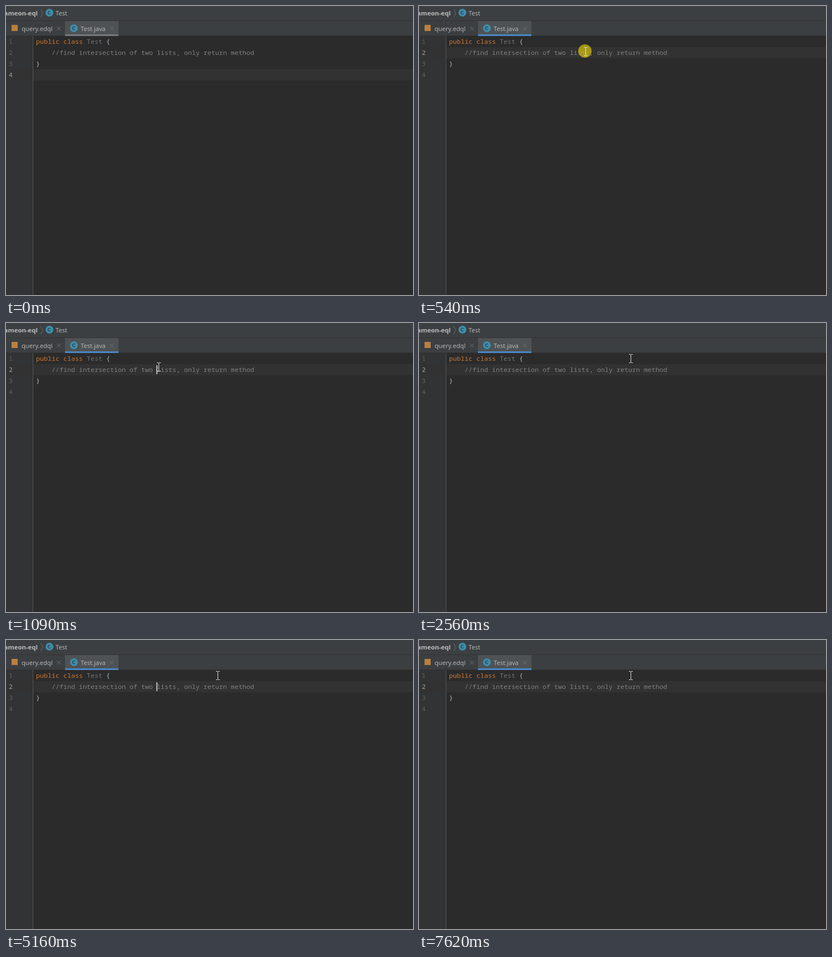
An HTML page with a canvas for the animation above (8 s loop, 731 by 520 pixels).

```html
<!DOCTYPE html>
<html lang="en">
<head>
<meta charset="utf-8">
<title>Code editor</title>
<style>
html, body { margin: 0; width: 100%; height: 100%; overflow: hidden; background: #2b2b2b; }
canvas { display: block; }
</style>
</head>
<body>
<canvas id="stage" width="731" height="520"></canvas>
<script>
const ctx = document.getElementById('stage').getContext('2d');
const LOOP = 8000, STEP = 70, ROW = 20;
const MONO = '11.667px "Noto Sans Mono", "DejaVu Sans Mono", monospace';
const UI = '11.2px "Open Sans", "Noto Sans", sans-serif';
const UI_BOLD = 'bold 11.4px "Open Sans", "Noto Sans", sans-serif';
const FIRST_CLICK = 480, SECOND_CLICK = 950, PRESS = 130;
const BLINK_START = 1540, BLINK = 505;

// Places where the pointer rests
const ENTRY = { x: 487, y: 511 };
const WORD_END = { x: 299, y: 82 };
const WORD_START = { x: 274, y: 79 };
const REST = { x: 380, y: 64 };

const easeOut = k => 1 - (1 - k) ** 2;
const clamp = k => Math.min(1, Math.max(0, k));

function glide(a, b, t, from, to) {
  const k = easeOut(clamp((t - from) / (to - from)));
  return { x: Math.round(a.x + (b.x - a.x) * k), y: Math.round(a.y + (b.y - a.y) * k) };
}

function pointerAt(t) {
  const q = Math.floor((t - 40) / STEP) * STEP + 40;
  if (t < 740) return glide(ENTRY, WORD_END, q, 40, 460);
  if (t < 1090) return glide(WORD_END, WORD_START, q, 740, 950);
  return glide(WORD_START, REST, q, 1160, 1300);
}

const isPressed = t => [FIRST_CLICK, SECOND_CLICK].some(c => t >= c && t < c + PRESS);

function rect(x, y, w, h, color) {
  ctx.fillStyle = color;
  ctx.fillRect(x, y, w, h);
}

function text(str, x, y, color, font = MONO, align = 'left') {
  ctx.font = font;
  ctx.fillStyle = color;
  ctx.textAlign = align;
  ctx.fillText(str, x, y);
}

function disc(x, y, r, color) {
  ctx.fillStyle = color;
  ctx.beginPath();
  ctx.arc(x, y, r, 0, Math.PI * 2);
  ctx.fill();
}

function line(color, ...pts) {
  ctx.strokeStyle = color;
  ctx.lineWidth = 1;
  ctx.beginPath();
  pts.forEach(([x, y]) => ctx.lineTo(x, y));
  ctx.stroke();
}

function classIcon(x, y) {
  disc(x, y, 7, '#3f8cab');
  ctx.strokeStyle = '#2b414b';
  ctx.lineWidth = 1.2;
  ctx.beginPath();
  ctx.arc(x, y, 2.5, 0.8, Math.PI * 2 - 0.8);
  ctx.stroke();
}

function closeIcon(x, y) {
  line('#707375', [x - 3.5, y - 3.5], [x + 3.5, y + 3.5]);
  line('#707375', [x - 3.5, y + 3.5], [x + 3.5, y - 3.5]);
}

function drawBars(focused) {
  rect(0, 0, 731, 54, '#3c3f41');
  rect(0, 26, 731, 1, '#323232');
  text('ameon-eql', 57, 17, '#bbbbbb', UI_BOLD, 'right');
  line('#6a6d6f', [62.5, 6], [66, 13], [62.5, 20]);
  classIcon(78, 12);
  text('Test', 89, 17, '#bbbbbb', UI);

  rect(0, 53, 731, 1, '#323232');
  rect(106, 27, 96, 27, '#4e5254');
  rect(106, 51, 96, 3, focused ? '#4a88c7' : '#747a80');
  rect(10, 34, 11, 11, '#b9803f');
  text('query.edql', 28, 45, '#bbbbbb', UI);
  closeIcon(95, 40.5);
  classIcon(122, 40);
  text('Test.java', 134, 45, '#bbbbbb', UI);
  closeIcon(190, 40.5);
}

function drawCode(row) {
  rect(0, 54, 731, 466, '#2b2b2b');
  rect(0, 54, 48, 466, '#313335');
  rect(0, 34 + row * ROW, 731, ROW, '#323232');
  rect(48, 54, 1, 466, '#555555');
  for (let n = 1; n <= 4; n++) {
    text(n, 5, 48 + n * ROW, n === row ? '#a4a3a3' : '#606366');
  }
  text('public class', 54, 68, '#cc7832');
  text('Test', 145, 68, '#72737a');
  text('{', 180, 68, '#a9b7c6');
  text('//find intersection of two lists, only return method', 82, 88, '#808080');
  text('}', 54, 108, '#a9b7c6');
}

function drawCaret(t) {
  const hidden = t >= BLINK_START && Math.floor((t - BLINK_START) / BLINK) % 2 === 0;
  if (!hidden) rect(t < SECOND_CLICK ? 298 : 270, 76, 2, 16, '#bbbbbb');
}

function drawPointer(t) {
  const { x, y } = pointerAt(t);
  const pressed = isPressed(t);
  if (pressed) disc(x - 1, y - 1, 12, 'rgba(190,173,17,0.82)');
  const color = pressed ? '#e3dc9c' : '#dedede';
  rect(x, y - 7, 1, 14, color);
  for (const dy of [-8, 7]) {
    rect(x - 3, y + dy, 3, 1, color);
    rect(x + 1, y + dy, 3, 1, color);
  }
}

function draw(now) {
  const t = (now - start) % LOOP;
  const focused = t >= FIRST_CLICK;
  drawCode(focused ? 2 : 4);
  drawBars(focused);
  if (focused) drawCaret(t);
  if (t >= STEP) drawPointer(t);
}

function tick() {
  draw(performance.now());
  requestAnimationFrame(tick);
}

const start = performance.now();
tick();
</script>
</body>
</html>
```
